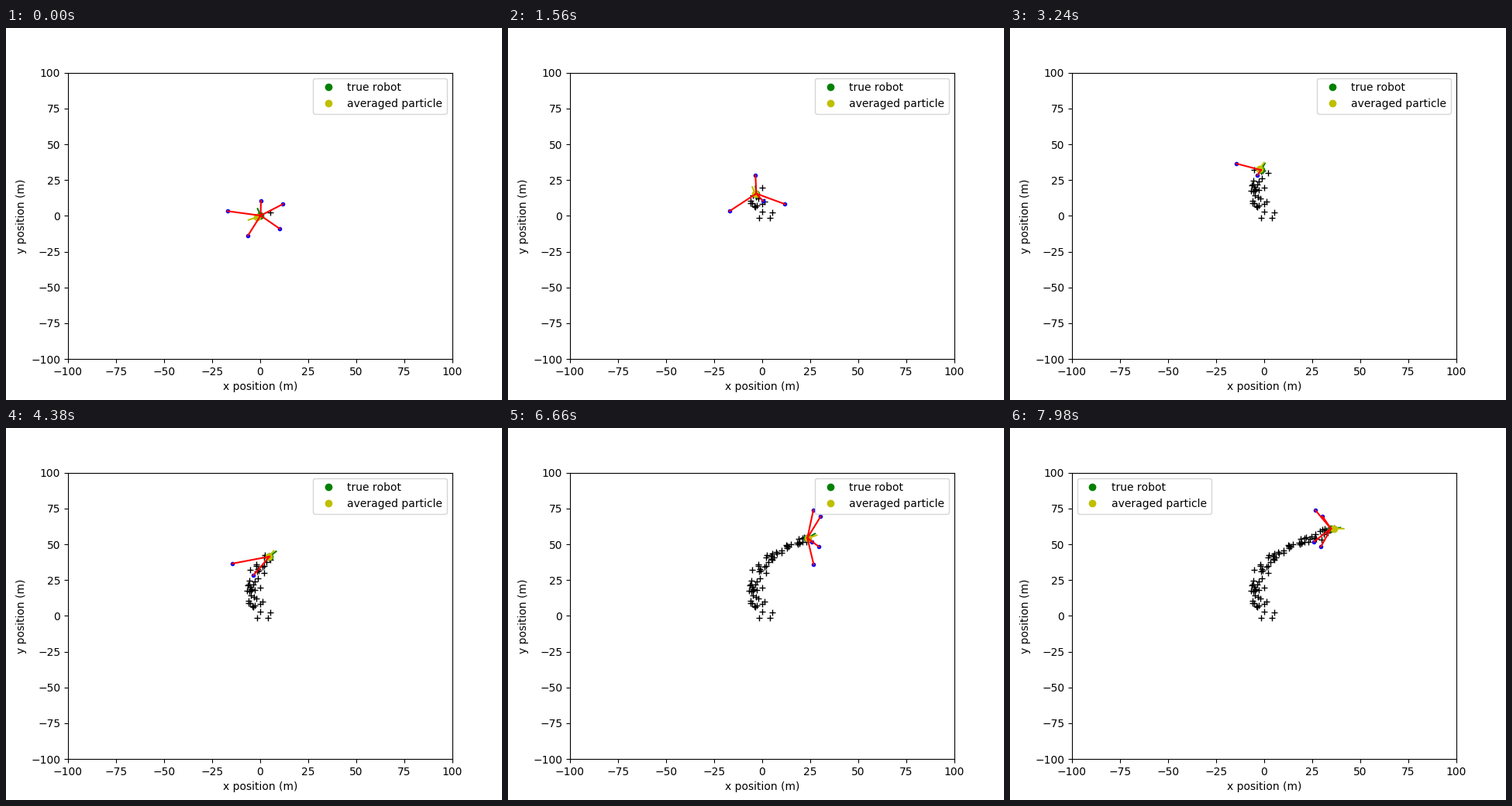
Animation of 640 by 480 pixels, one loop 8000 ms. Source, as a matplotlib script:

```python
import numpy as np
import matplotlib.pyplot as plt
from matplotlib.animation import FuncAnimation

STEPS = 134          # one simulation step lasts 60 ms
SPEED = 0.6          # metres per step
VIEW = 20            # sensor range
POINTER = 5          # heading line length
MARK_EVERY = 1.7     # steps between crosses
LEGEND_MOVE = 127

plt.rcParams["text.kerning_factor"] = 6

landmarks = np.array([
    (-17, 3.3), (0.4, 10.4), (11.8, 8.2), (10.2, -9), (-6.4, -13.8),
    (-3.5, 28.4), (-14.5, 36.5), (25.9, 51.8), (29.5, 48.3),
    (26.8, 35.8), (26.6, 73.8), (30.4, 69.4),
])

# Waypoints of the drive: step, position, heading.
keys = np.array([0, 15, 36, 73, 94, 111, 133])
path = np.array([(0.2, 0.2), (-2.4, 8.9), (-3.6, 21.6), (4.8, 41.4),
                 (14.9, 49.0), (23.5, 54.3), (34.7, 60.9)])
turn = np.radians([108, 97, 95, 46, 30, 38, 8])


def unit(angle):
    return np.stack([np.cos(angle), np.sin(angle)], axis=-1)


def hermite(step):
    """Position and heading on the smooth path at a step."""
    i = min(np.searchsorted(keys, step, side="right") - 1, len(keys) - 2)
    span = keys[i + 1] - keys[i]
    s = (step - keys[i]) / span
    p, q = path[i], path[i + 1]
    u, v = unit(turn[i:i + 2]) * SPEED * span
    pos = ((2 * s**3 - 3 * s**2 + 1) * p + (s**3 - 2 * s**2 + s) * u
           + (3 * s**2 - 2 * s**3) * q + (s**3 - s**2) * v)
    vel = ((6 * s**2 - 6 * s) * (p - q) + (3 * s**2 - 4 * s + 1) * u
           + (3 * s**2 - 2 * s) * v)
    return pos, np.arctan2(vel[1], vel[0])


steps = np.arange(STEPS)
poses = [hermite(k) for k in steps]
robot = np.array([p for p, _ in poses])
heading = np.array([a for _, a in poses])

# The estimate starts out wrong, then settles to a small jitter.
rng = np.random.default_rng(4)
settle = np.exp(-steps / 5)
jitter = (1 - settle) * 0.6
estimate = robot + settle[:, None] * (-1.7, -1.1)
estimate += rng.normal(size=(STEPS, 2)) * jitter[:, None]
est_heading = heading + settle * np.radians(95)
est_heading += rng.normal(size=STEPS) * jitter * 0.25

# Crosses scatter around the path, more widely at first.
births = np.arange(0, STEPS, MARK_EVERY).astype(int)
spread = 1.5 + 1.7 * np.exp(-births / 40)
marks = robot[births] + rng.normal(size=(len(births), 2)) * spread[:, None]

fig, ax = plt.subplots(figsize=(6.4, 4.8), dpi=100)
ax.set(xlim=(-100, 100), ylim=(-100, 100),
       xlabel="x position (m)", ylabel="y position (m)")

crosses, = ax.plot([], [], "k+")
true_dot, = ax.plot([], [], "go", label="true robot")
true_line, = ax.plot([], [], "g")
est_dot, = ax.plot([], [], "yo", label="averaged particle")
est_line, = ax.plot([], [], "y")
seen_dots, = ax.plot([], [], "b.")
rays, = ax.plot([], [], "r")
legend = ax.legend(loc="upper right")


def place(dot, line, pos, angle):
    tip = pos + POINTER * unit(angle)
    dot.set_data([pos[0]], [pos[1]])
    line.set_data([pos[0], tip[0]], [pos[1], tip[1]])


def draw(frame):
    k = (2 * frame + 1) // 3
    place(true_dot, true_line, robot[k], heading[k])
    place(est_dot, est_line, estimate[k], est_heading[k])
    crosses.set_data(*marks[births <= k].T)

    gap = np.hypot(*(landmarks - robot[k]).T)
    seen = landmarks[gap < VIEW]
    seen_dots.set_data(*seen.T)
    fan = np.full((len(seen), 3, 2), np.nan)
    fan[:, 0], fan[:, 1] = robot[k], seen
    rays.set_data(*fan.reshape(-1, 2).T)

    legend.set_loc("upper left" if k >= LEGEND_MOVE else "upper right")


anim = FuncAnimation(fig, draw, frames=200, interval=40,
                     init_func=lambda: draw(0), repeat=True, repeat_delay=0)
plt.show()
```
